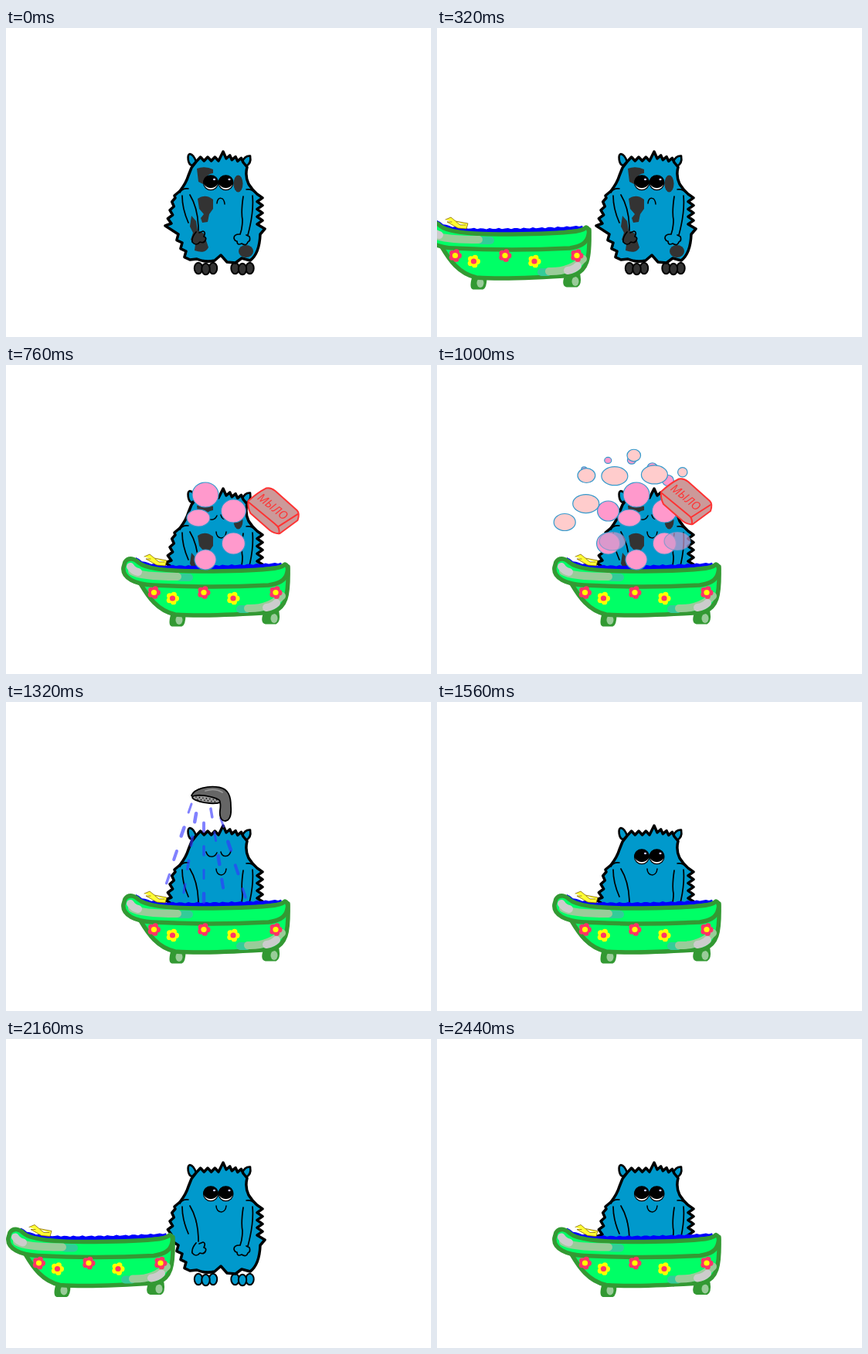
These frames come from a looping animation (550x400 px, 2480 ms). An HTML page:

```html
<!DOCTYPE html>
<html lang="ru">
<head>
<meta charset="utf-8">
<title>Bath time</title>
<style>
html, body { margin: 0; width: 100%; height: 100%; overflow: hidden; background: #fff; }
svg { display: block; width: 100%; height: 100%; }
text { font: italic 15px "Open Sans", sans-serif; }
</style>
</head>
<body>
<svg viewBox="0 0 550 400" stroke-linejoin="round" stroke-linecap="round">
  <g id="monster" fill="#09c" stroke="#000">
    <g id="toes" stroke-width="2"></g>
    <g stroke-width="2.6">
      <path d="M241 178C235 177 234 164 238 163Q243 164 246 173Z"/>
      <path d="M306 173Q309 165 316 165.500Q318 176 310 179Z"/>
    </g>
    <path id="body" stroke-width="3.5"/>
    <g id="dirt" fill="#333" stroke="none">
      <path d="M247 182Q258 178 268 183V188Q259 189 258 197L255 202L249 199Z"/>
      <ellipse cx="300.500" cy="201.500" rx="6" ry="11"/>
      <path d="M248 221Q258 214 268 222V234L263 241L261 251L254 252L252 246L256 241L250 234Z"/>
      <path d="M240 243L246 250L248 262L256 266L262 284Q258 293 244 288L245 280L239 274L242 265L238 257Z"/>
      <ellipse cx="310.500" cy="289" rx="9.500" ry="8"/>
    </g>
    <g fill="none" stroke-width="1.700">
      <path d="M236 208Q228 207 225 213M228 217Q228 234 236 252M238 216Q249 234 249 262"/>
      <path d="M311 209Q318 208 322 213M307 218Q304 238 306 248Q306 259 303 267M319 217Q321 238 313 268"/>
      <path d="M246 264Q240 271 241 277Q246 283 251 277Q256 279 258 275Q260 271 256 270Q259 264 255 263L250 265"/>
      <path d="M302 267Q295 267 295 272Q296 276 299 276Q299 282 305 279Q311 283 313 277Q317 275 315 270L311 268"/>
    </g>
    <g id="open" stroke-width="1.300"></g>
    <g fill="none" stroke-width="1.500">
      <path id="shut" d="M259 194C261 202 270 202 273 195M278 194C280 202 289 201 291 193"/>
      <path id="mouth"/>
    </g>
  </g>
  <g id="tub">
    <g stroke="#393" stroke-width="3" fill="#393">
      <path d="M215 322Q211 336 215 337H227Q231 336 231 323Z"/>
      <path d="M335 320Q330 333 336 334H349Q354 332 352 320Z"/>
    </g>
    <g fill="#9c9">
      <ellipse cx="224" cy="330" rx="4.500" ry="6"/>
      <ellipse cx="347" cy="328" rx="4.500" ry="6"/>
    </g>
    <path id="water" fill="#00f"/>
    <path fill="#ff3" stroke="#860" stroke-width=".8" d="M179 248L186 245L192 250L208 253L206 260L195 259L181 251L187 251M193 251L198 255L205 255"/>
    <g fill="#0f6" stroke="#393" stroke-width="5.500">
      <path d="M174 283C184 300 196 318 219 323Q260 326 345 320C362 314 366 300 365 261Z"/>
      <path d="M154 255C159 248 167 251 172 256C182 265 215 267 250 267Q310 267 340 264Q356 263 361 258Q366 260 364 268C362 279 353 283 340 285Q265 289 190 285C168 284 150 276 152 262Z"/>
    </g>
    <g fill="none" stroke-width="10">
      <path stroke="#3c9" d="M225 275H237M303 316H312"/>
      <path stroke="#9c9" d="M163 267Q174 274 222 274M313 315Q340 316 357 299"/>
      <path stroke="#ccc" d="M161 261Q165 267 171 268M337 314Q345 313 350 308"/>
    </g>
    <g id="flowers"></g>
  </g>
  <g id="bubbles" stroke="#39c" stroke-width="1.200"></g>
  <g id="soap" fill="#c99" stroke="#f33" stroke-width="2">
    <path d="M290 164Q302 153 313 147.500Q319 146 325 151L353 176Q357 180 354 189L331 206Q325 207 318 202L293 180Q289 172 290 164Z"/>
    <path fill="none" d="M291 166L325 194Q331 198 330 206M329 197L354 181"/>
    <text transform="translate(322 171) rotate(39)" y="5.500" text-anchor="middle" fill="#f33" stroke="none">МЫЛО</text>
  </g>
  <g id="shower">
    <g id="rain" stroke="#33f" stroke-opacity=".62"></g>
    <g stroke="#000" stroke-width="1.800">
      <path fill="#666" d="M240 121C244 112 262 108 276 110.500C288 113 291 122 291 135C292 147 290 153 284 154C278 154 276 148 277 140Q278 133 277 130C262 132 245 128 240 121Z"/>
      <path fill="none" stroke="#999" d="M258 115Q270 111 280 117"/>
      <ellipse cx="259" cy="126" rx="18" ry="4.500" transform="rotate(9 259 126)" fill="#999"/>
      <path fill="none" stroke-width="1.600" stroke-dasharray="0 4.500" d="M246 123L274 127M248 126L273 129.500"/>
    </g>
  </g>
</svg>
<script>
const LOOP = 2480, STEP = 40;
const { sin, cos, exp, floor, PI } = Math;
const $ = id => document.getElementById(id);
const show = (id, on) => $(id).style.display = on ? '' : 'none';
const move = (id, x, y) => $(id).setAttribute('transform', `translate(${x} ${y})`);
const oval = (x, y, rx, ry, more = '') => `<ellipse cx="${x}" cy="${y}" rx="${rx}" ry="${ry}" ${more}/>`;
const repeat = (n, make) => Array.from({ length: n }, (_, i) => make(i));

// A row of n spikes between two points; the height runs from h0 to h1.
function fur(x0, y0, x1, y1, n, h0, h1 = h0) {
  const dx = x1 - x0, dy = y1 - y0, len = Math.hypot(dx, dy);
  return repeat(n, i => {
    const tip = (i + 0.5) / n, end = (i + 1) / n, h = (h0 + (h1 - h0) * tip) / len;
    return `L${x0 + dx * tip + dy * h} ${y0 + dy * tip - dx * h}L${x0 + dx * end} ${y0 + dy * end}`;
  }).join('');
}

$('body').setAttribute('d', 'M240 181L247 172' + fur(247, 172, 275, 172, 3, 5) +
  'L281 160L285 169' + fur(285, 169, 307, 174, 3, 5) +
  'L312 180Q309 192 314 202Q319 210 325 215' + fur(325, 215, 325, 254, 4, 7) +
  'L335 260L329 267Q328 292 316 301L305 298L297 304L286 303L278 294L270 301Q258 304 247 299L238 300' +
  fur(238, 300, 223, 267, 3, 5) + 'L206 256L214 253' + fur(214, 253, 219, 220, 3, 6, 3) +
  'L218 217L225 211Q233 201 236 191Z');

$('toes').innerHTML = [258.5, 306].map(x =>
  [-1, 1, 0].map(i => oval(x + 9.5 * i, 312 - i * i, 5.2, 7.2)).join('')).join('');

$('open').innerHTML = [265, 284.5].map(x =>
  oval(x, 200.5, 9.4, 9.2, 'fill="#fff"') + oval(x, 198.8, 9, 7.8, 'fill="#000"') +
  oval(x + 4.5, 196, 1.6, 1.2, 'fill="#ccf" stroke="none"')).join('');

$('water').setAttribute('d', 'M168 264' + repeat(48, i => {
  const x = 4 * i;
  return `L${168 + x} ${260 - 11 * exp(-x / 15) - 4 * (x / 189) ** 3 + 0.8 * sin(x)}`;
}).join('') + 'L360 266H175Z');

function flower(x, y, petal, core) {
  return repeat(5, i => {
    const a = i * PI * 0.4 - 1.2;
    return oval(x + 4.8 * cos(a), y + 4.8 * sin(a), 3.7, 3.7, `fill="${petal}"`);
  }).join('') + oval(x, y, 3.6, 3.6, `fill="${core}"`);
}
$('flowers').innerHTML = [191.5, 215.5, 256, 294, 349].map((x, i) =>
  i % 2 ? flower(x, 302, '#ff0', '#f36') : flower(x, 294.5, '#f36', '#ff0')).join('');

// Bubbles sit on rings around the belly; the outer ones are smaller.
function bubble(deg, dist, rx, ry, look) {
  const a = deg * PI / 180;
  return oval(258 + dist * cos(a), 210 + dist * sin(a), rx, ry, look);
}
const PINK = 'fill="#f9c"', PALE = 'fill="#fcc"';
const CLEAR = 'fill="#c9c" fill-opacity=".7" stroke-opacity=".5"';
$('bubbles').innerHTML = bubble(233, 15, 15, 11, PINK) +
  repeat(6, i => bubble(90 - 60 * i, 42, 14 + i % 4, 13 + i % 4, PINK)).join('') +
  [227, 311].map(x => oval(x, 228, 17, 12, CLEAR)).join('') +
  repeat(5, i => bubble(228 + 19 * i, 101 - 7 * i, 3.5 + i, 3 + i, PINK)).join('') +
  repeat(7, i => i % 2
    ? bubble(184 + 21 * i, 72, 17, 12, PALE)
    : bubble(184 + 21 * i, 93, 14 - 1.3 * i, 11 - 0.8 * i, PALE)).join('');
const bubbles = [...$('bubbles').children];

// Five streams of water fan out below the shower.
$('rain').innerHTML = repeat(20, i => {
  const s = i % 5, f = (floor(i / 5) + (s * 2 % 5) / 5) / 4;
  const dx = 19 * s - 38, x = 240 + 8 * s + dx * f, y = 132 + 122 * f;
  return `<path d="M${x} ${y}l${dx / 10} 11" stroke-width="${3 + i * 7 % 4 / 2}"/>`;
}).join('');

const SAD = 'M273 227C274 218 282 218 283 228', SMILE = 'M272 216C272 226 284 227 285 216';

function tubPlace(t) {
  if (t < 160) return null;
  if (t < 600) return [-264 + 24 * (t - 160) / STEP, 0];
  if (t < 1840) return [0, 0];
  if (t < 2000 || t >= 2440) return [0, -4.5];
  return [-15 - 33.5 * (t - 2000) / STEP, -4.5];
}

function draw(now) {
  const t = floor((now % LOOP) / STEP) * STEP;
  const soapy = t >= 720 && t < 1280, wet = t >= 1280 && t < 1560;
  const dirty = t < 1280;

  const tub = tubPlace(t);
  show('tub', tub);
  if (tub) move('tub', ...tub);

  show('dirt', dirty);
  $('toes').setAttribute('fill', dirty ? '#333' : '#09c');
  show('shut', soapy || wet);
  show('open', !soapy && !wet);
  $('mouth').setAttribute('d', t < 720 ? SAD : SMILE);

  // The soap rubs to and fro while the foam swells and shrinks.
  show('soap', soapy);
  show('bubbles', soapy);
  if (soapy) {
    const u = (t - 720) / 560;
    move('soap', 30 * cos(3 * PI * u), 64 * sin(2 * PI * u) ** 2);
    bubbles.forEach((b, i) => b.style.display = i < bubbles.length * sin(PI * u) ? '' : 'none');
  }

  show('shower', wet);
  if (wet) move('shower', 0, floor((t - 1240) / 80) % 2 ? 0 : -12);
}

const start = performance.now();
function tick() {
  draw(performance.now() - start);
  requestAnimationFrame(tick);
}
tick();
</script>
</body>
</html>
```
